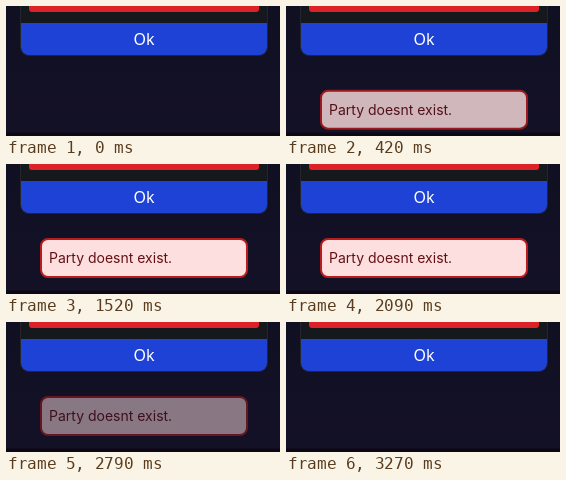
Animation, 274 px wide and 130 px high, one loop 3390 ms. Source, as an HTML page:

```html
<!DOCTYPE html>
<html lang="en">
<head>
<meta charset="utf-8">
<title>Toast message</title>
<style>
  html, body { margin: 0; width: 100%; height: 100%; overflow: hidden; }
  body { position: relative; background: linear-gradient(#101022, #141127 126px, #0d0714 127px); }
  div { position: absolute; box-sizing: border-box; }
  .card {
    left: 14px; top: -20px; width: 248px; height: 70px; overflow: hidden;
    background: #15181d; border: 1px solid #24262d; border-radius: 9px;
  }
  .bar { left: 8px; top: 0; width: 230px; height: 25px; background: #dc2127; border-radius: 3px; }
  .button {
    left: 0; top: 36px; width: 246px; height: 32px; background: #1d42d5; color: #fff;
    font: 16px/32px "Noto Sans", sans-serif; text-align: center;
  }
  .toast {
    left: 34px; top: 74px; width: 208px; height: 40px; padding-left: 7px;
    background: #fddfdf; border: 2px solid #b91c1c; border-radius: 8px;
    color: #641014; font: 14px/36px Inter, sans-serif; white-space: nowrap;
  }
</style>
</head>
<body>
<div class="card">
  <div class="bar"></div>
  <div class="button">Ok</div>
</div>
<div class="toast" id="toast">Party doesnt exist.</div>
<script>
  const LOOP = 3390;
  const ENTER = { start: 290, length: 310, rise: 50 };
  const LEAVE = { start: 2540, length: 500 };
  const toast = document.getElementById("toast");

  const progress = (time, { start, length }) => Math.min(1, Math.max(0, (time - start) / length));
  const easeOut = t => 1 - (1 - t) ** 3;
  const easeInOut = t => t * t * (3 - 2 * t);

  function draw(now) {
    const time = now % LOOP;
    const shown = easeOut(progress(time, ENTER));
    const gone = easeInOut(progress(time, LEAVE));
    toast.style.opacity = shown * (1 - gone);
    toast.style.transform = `translateY(${ENTER.rise * (1 - shown)}px)`;
    requestAnimationFrame(draw);
  }
  draw(0);
</script>
</body>
</html>
```
